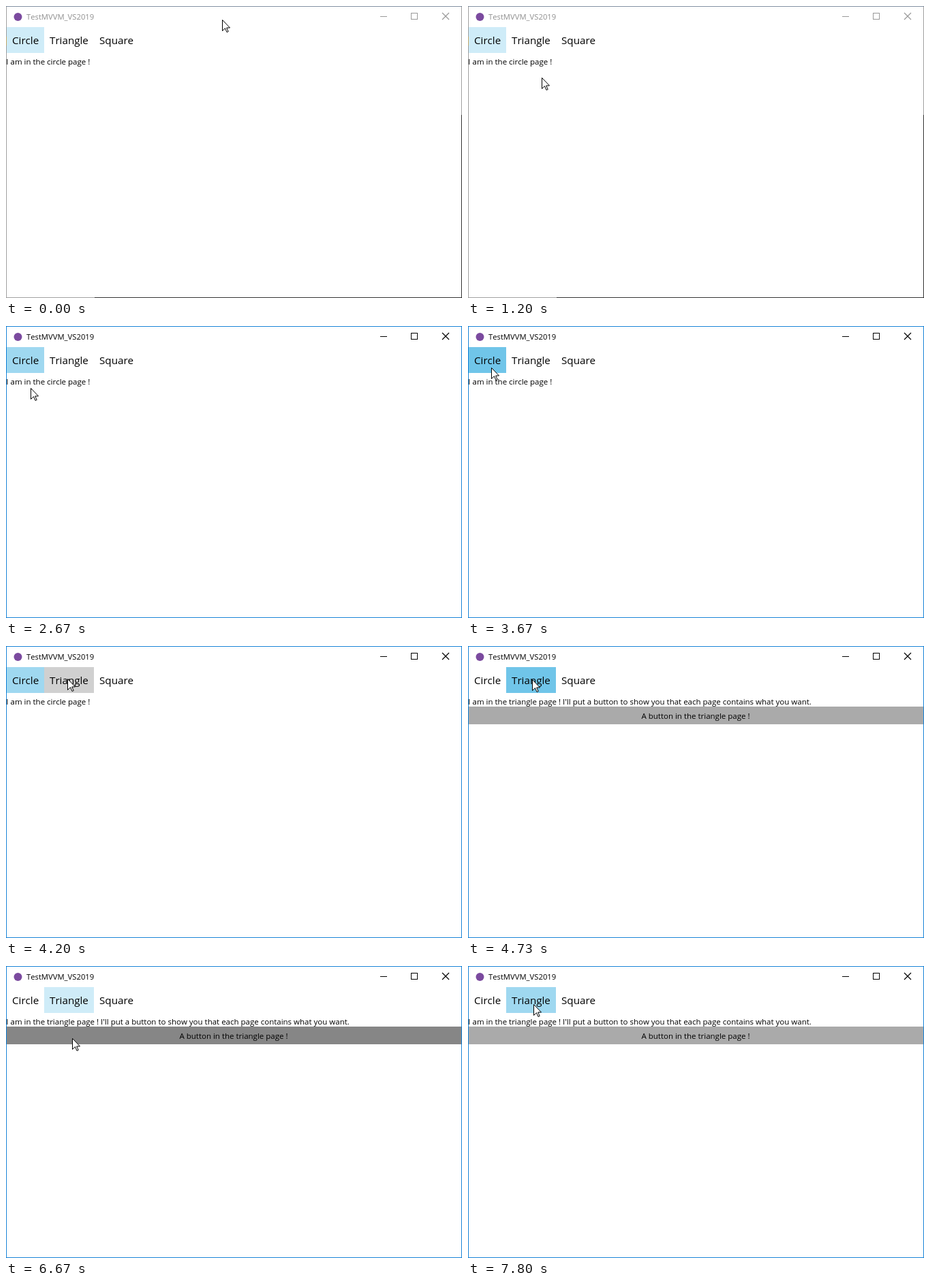
An HTML page for the animation above (8 s loop, 669x429 px).

```html
<!DOCTYPE html>
<html lang="en">
<head>
<meta charset="utf-8">
<title>Tab pages</title>
<style>
  html, body { margin: 0; width: 100%; height: 100%; overflow: hidden; background: #fff; }
  svg { display: block; width: 669px; height: 429px; }
  text { font: 11.5px "Open Sans", "Noto Sans", sans-serif; font-kerning: none; white-space: pre; }
  .tab { font-size: 15.2px; }
  .title { font-size: 11.25px; }
  .crisp { shape-rendering: crispEdges; }
</style>
</head>
<body>
<svg viewBox="0 0 669 429">
  <rect width="669" height="429" fill="#fff"/>

  <g class="crisp">
    <rect id="circleTab" x="1" y="31" width="55" height="38"/>
    <rect id="triangleTab" x="56" y="31" width="73" height="38"/>
  </g>
  <text class="tab" x="9" y="56">Circle</text>
  <text class="tab" x="64" y="56">Triangle</text>
  <text class="tab" x="137" y="56">Square</text>

  <text id="circlePage" x="0.3" y="86">I am in the circle page !</text>
  <g id="trianglePage">
    <text x="0.3" y="86">I am in the triangle page ! I'll put a button to show you that each page contains what you want.</text>
    <rect id="button" class="crisp" x="1" y="89" width="667" height="26"/>
    <text x="334" y="107" text-anchor="middle">A button in the triangle page !</text>
  </g>

  <circle cx="17.5" cy="16" r="6" fill="#7b4a9f"/>
  <text id="title" class="title" x="30" y="20">TestMVVM_VS2019</text>
  <g id="controls" fill="none">
    <path class="crisp" d="M549 15.5h10M594.5 10.5h9v9h-9z"/>
    <path d="M640 10l10 10M650 10l-10 10" stroke-width="1.2"/>
  </g>

  <g id="idleFrame" class="crisp" fill="none">
    <path d="M0 .5H669" stroke="#8290a2"/>
    <path d="M.5 1V429M668.5 1V160M0 428.5H130" stroke="#a0a0a0"/>
    <path d="M668.5 160V429M130 428.5H669" stroke="#333"/>
    <path d="M.5 45V58" stroke="#c8a766"/>
  </g>
  <rect id="activeFrame" class="crisp" x=".5" y=".5" width="668" height="428" fill="none" stroke="#1883d7"/>

  <path id="cursor" d="M.5.5V16.5L4.5 12.7L7 18.5L9.2 17.5L6.7 12H11.5Z"
        fill="#fff" stroke="#000" stroke-linejoin="round"/>
</svg>
<script>
const LOOP = 8000, FPS = 15;
const WHITE = "#fff", HOVER = "#d0d0d0";
const SELECTED = "#cfecf8", ACCENT = "#9fd8f0", STRONG = "#70c5e9";

// Times in ticks of 1/FPS s
const ACTIVATE = 33, SELECT = 71, PRESS = 100, RELEASE = 102;

// Each move is a Bezier curve that starts where the last one ended
const START = [317, 20];
const moves = [
  { from: 8, to: 21, curve: [[197, 128], [36, 99]] },
  { from: 21, to: 30, curve: [[28, 60], [34, 55]] },
  { from: 38, to: 55, curve: [[28, 175], [136, 130], [34, 61]] },
  { from: 55, to: 64, curve: [[75, 45], [94, 49]] },
  { from: 77, to: 89, curve: [[104, 212], [99, 136]] },
  { from: 91, to: 99, curve: [[97, 106]] },
  { from: 109, to: 117, curve: [[96, 56]] }
];

const $ = id => document.getElementById(id);
const set = (id, attrs) => {
  for (const name in attrs) $(id).setAttribute(name, attrs[name]);
};
const show = (id, on) => set(id, { visibility: on ? "visible" : "hidden" });

const mix = (a, b, u) => a.map((v, i) => v + (b[i] - v) * u);

function bezier(points, u) {
  if (points.length === 1) return points[0];
  return bezier(points.slice(1).map((p, i) => mix(points[i], p, u)), u);
}

function pointer(tick) {
  let place = START;
  for (const { from, to, curve } of moves) {
    if (tick <= from) break;
    place = bezier([place, ...curve], Math.min(1, (tick - from) / (to - from)));
  }
  return place.map(Math.round);
}

function tabColor(selected, focused, over) {
  if (!selected) return over ? HOVER : WHITE;
  return [SELECTED, ACCENT, STRONG][focused + over];
}

function draw(time) {
  const tick = Math.floor((time + 4) * FPS / 1000);
  const [x, y] = pointer(tick);
  const active = tick >= ACTIVATE;
  const onTriangle = tick >= SELECT;
  const pressed = tick >= PRESS && tick < RELEASE;
  const overTabs = y >= 31 && y < 69;

  set("cursor", { transform: `translate(${x} ${y})` });
  set("circleTab", { fill: tabColor(!onTriangle, active, overTabs && x < 56) });
  set("triangleTab", {
    fill: tabColor(onTriangle, tick < PRESS, overTabs && x >= 56 && x < 129)
  });
  set("button", { fill: pressed ? "#868686" : "#aaa" });
  set("title", { fill: active ? "#000" : "#8f8f8f" });
  set("controls", { stroke: active ? "#000" : "#999" });

  show("circlePage", !onTriangle);
  show("trianglePage", onTriangle);
  show("idleFrame", !active);
  show("activeFrame", active);
}

const start = performance.now();
function loop() {
  draw((performance.now() - start) % LOOP);
  requestAnimationFrame(loop);
}
draw(0);
requestAnimationFrame(loop);
</script>
</body>
</html>
```
